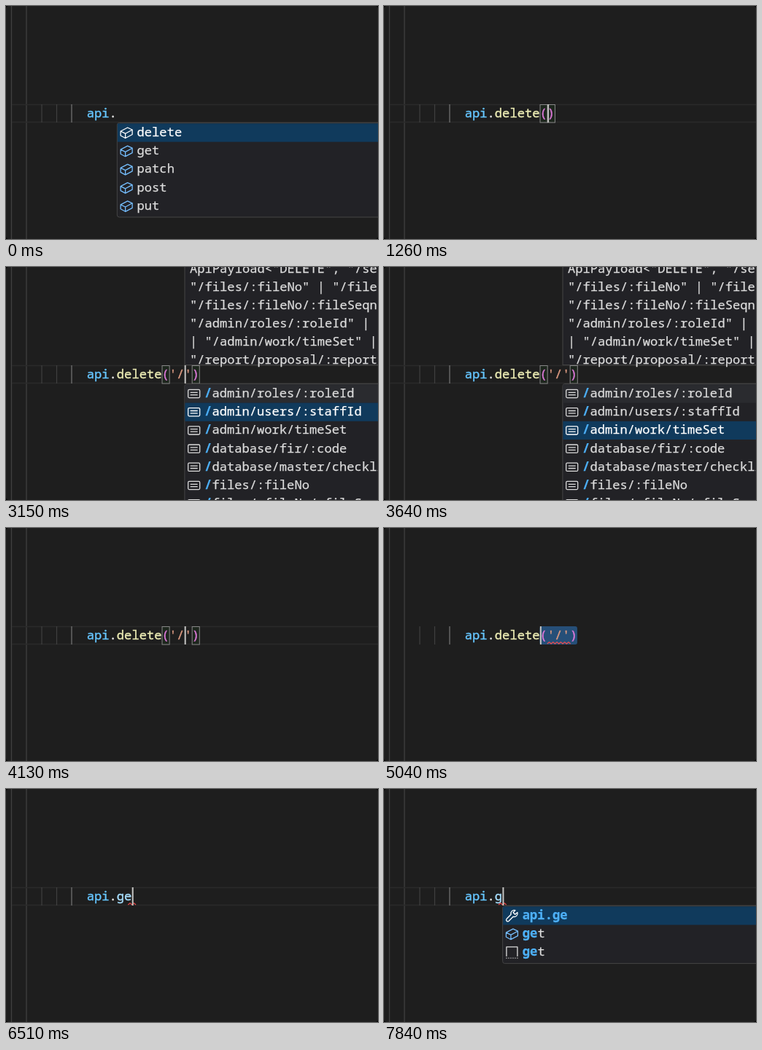
An HTML page that plays this animation: 510 px wide and 320 px high, repeating every 8000 ms.

```html
<!DOCTYPE html>
<html lang="en">
<head>
<meta charset="utf-8">
<title>Editor completion</title>
<style>
html, body { margin: 0; width: 100%; height: 100%; overflow: hidden; background: #000; }
svg { display: block; width: 510px; height: 320px; }
text { font: 17.14px "Noto Sans Mono", "DejaVu Sans Mono", monospace; white-space: pre; font-variant-ligatures: none; stroke-width: .25; }
.code { stroke-width: .4; }
.match { font-weight: 700; }
.icon { fill: none; stroke-width: 1.3; stroke-linejoin: round; stroke-linecap: round; }
</style>
</head>
<body>
<svg viewBox="0 0 510 320">
  <rect width="510" height="320" rx="4" fill="#1e1e1e"/>
  <path d="M7.5 0V320M28 0V320" stroke="#404040" stroke-width="1.3"/>
  <g id="view"></g>
</svg>
<script>
const LOOP = 8000, CHAR = 10.285, LEFT = 110.7, TOP = 135, ROW = 25.2;
const PANEL = '#222226', EDGE = '#454545', BLUE = '#75beff', PLAIN = '#dcdcdc';
const MATCH = '#4db0f8', BRACKET = '#dc78d8';
const view = document.getElementById('view');
const colX = col => LEFT + col * CHAR;
const escapeText = s => s.replace(/&/g, '&amp;').replace(/</g, '&lt;');

const rect = (x, y, w, h, fill, extra = '') =>
  `<rect x="${x}" y="${y}" width="${w}" height="${h}" fill="${fill}" ${extra}/>`;
const text = (x, y, s, fill, extra = '') =>
  `<text x="${x}" y="${y}" fill="${fill}" stroke="${fill}" ${extra}>${escapeText(s)}</text>`;

const icons = {
  method: 'M-8-2L1.5-7L8-4V2.5L-1.5 7.5L-8 4ZM-8-2L-1.5 1.2L8-4M-1.5 1.2V7.5',
  value: 'M-6.5-5.6H6.5Q8-5.6 8-4.1V4.1Q8 5.6 6.5 5.6H-6.5Q-8 5.6-8 4.1V-4.1Q-8-5.6-6.5-5.6ZM-4.5-1.7H4.5M-4.5 1.7H4.5',
  wrench: 'M7.5-4.5L4.3-1.7L1.7-4.3L4.5-7.5C1-8.5-2.3-5.5-1.3-1.7L-7.2 4.2C-9 6.5-6.5 9-4.2 7.2L1.7 1.3C5.5 2.3 8.5-1 7.5-4.5Z',
  snippet: 'M-7.5 5V-7.5H7.5V5M-7.5 7.8h.1M-4.5 7.8h.1M-1.5 7.8h.1M1.5 7.8h.1M4.5 7.8h.1M7.5 7.8h.1'
};

// Each item: icon, matched prefix, remaining text
const methods = ['delete', 'get', 'patch', 'post', 'put'].map(s => ['method', '', s]);
const routes = [
  'admin/roles/:roleId', 'admin/users/:staffId', 'admin/work/timeSet',
  'database/fir/:code', 'database/master/checklist', 'files/:fileNo',
  'files/:fileNo/:fileSeqno'
].map(s => ['value', '/', s]);
const fixes = [['wrench', 'api.ge', ''], ['method', 'ge', 't'], ['snippet', 'ge', 't']];

const docLines = [
  'ApiPayload<"DELETE", "/se', '"/files/:fileNo" | "/file',
  '"/files/:fileNo/:fileSeqn', '"/admin/roles/:roleId" | ',
  '| "/admin/work/timeSet" | ', '"/report/proposal/:report'
];

function drawList(items, col, selected) {
  const x = colX(col) + .5, top = 161.4;
  let out = rect(x, 160.5, 400, items.length * ROW + 3.5, PANEL, `rx="3" stroke="${EDGE}"`);
  items.forEach(([icon, match, rest], i) => {
    const y = top + i * ROW, on = i === selected;
    if (on) out += rect(x + .5, y, 400, ROW, '#103a5c');
    else if (i === 0 && selected > 0) out += rect(x + .5, y, 400, ROW, '#2a2b2f');
    const tint = on ? '#fff' : icon === 'method' ? BLUE : PLAIN;
    out += `<path class="icon" transform="translate(${x + 12.8} ${y + 12.6})" stroke="${tint}" d="${icons[icon]}"/>`;
    out += text(x + 27.2, y + 17.5, match, MATCH, 'class="match"');
    out += text(x + 27.2 + match.length * CHAR, y + 17.5, rest, on ? '#fff' : PLAIN);
  });
  return out;
}

function drawDocs() {
  return rect(245, -4, 300, 138.5, PANEL, `stroke="${EDGE}"`) +
    docLines.map((s, i) => text(252, 8 + i * 25, s, PLAIN)).join('');
}

function squiggle(from, to) {
  let d = `M${from} 159`;
  for (let x = from, up = true; x < to - 1; x += 2.65, up = !up) d += `l2.65 ${up ? -2.4 : 2.4}`;
  return `<path d="${d}" fill="none" stroke="#f14c4c" stroke-width="1.2" stroke-linejoin="round"/>`;
}

function drawCode({ member, args, called }) {
  const parts = [['api', '#66c6ff'], ['.', '#e6e6e6'], [member, called ? '#ececb4' : '#a8e0ff']];
  if (args !== null) parts.push(['(', BRACKET], [args, '#dc9a80'], [')', BRACKET]);
  let col = 0;
  return parts.map(([s, fill]) => {
    const out = text(colX(col), 153, s, fill, 'class="code"');
    col += s.length;
    return out;
  }).join('');
}

function draw(s) {
  let out = '';
  if (!s.sel) out += `<path d="M8 135.5H510M8 159.5H510" stroke="#2a2a2a" stroke-width="1.5"/>`;
  out += `<path d="M49 135V160M69.5 135V160" stroke="#404040" stroke-width="1.2"/>`;
  out += `<path d="M90 135V160" stroke="#777" stroke-width="1.2"/>`;
  if (s.sel) out += rect(colX(s.sel[0]), TOP, (s.sel[1] - s.sel[0]) * CHAR, 25, '#264f78', 'rx="3"');
  if (s.args !== null && !s.sel) {
    const open = 4 + s.member.length;
    for (const col of [open, open + 1 + s.args.length])
      out += rect(colX(col) + .5, TOP + .5, CHAR - .2, 24.5, '#1d261d', 'stroke="#888"');
  }
  out += drawCode(s);
  if (s.error === 'args') out += squiggle(colX(11), colX(14));
  if (s.error === 'end') out += squiggle(colX(s.col) - 5, colX(s.col) + 6);
  if (s.caret) out += rect(colX(s.col) + .3, TOP, 2, 25, '#c4c4c2');
  if (s.docs) out += drawDocs();
  if (s.list) out += drawList(s.list, s.listCol, s.row);
  view.innerHTML = out;
}

// Each step lists only what changes at its time
const steps = [
  [0, { member: '', args: null, called: false, col: 4, caret: false, sel: null,
        error: '', list: methods, listCol: 4, row: 0, docs: false }],
  [280, { caret: true }],
  [770, { member: 'delete', col: 10, list: null }],
  [1190, { args: '', col: 11 }],
  [1260, { called: true }],
  [1470, { args: "''", col: 12 }],
  [2030, { args: "'/'", col: 13 }],
  [2520, { caret: false }],
  [2730, { list: routes, listCol: 13, row: 0 }],
  [3010, { row: 1, caret: true }],
  [3080, { docs: true }],
  [3290, { row: 2 }],
  [3640, { caret: false }],
  [4060, { list: null, docs: false, caret: true }],
  [4340, { error: 'args' }],
  [4480, { col: 14 }],
  [4620, { col: 15 }],
  [5040, { col: 10, sel: [10, 15] }],
  [5110, { args: null, sel: null, error: '' }],
  [5180, { called: false }],
  [5390, { col: 4, sel: [4, 10] }],
  [5670, { member: '', sel: null }],
  [5740, { error: 'end' }],
  [6230, { member: 'g', col: 5 }],
  [6510, { member: 'ge', col: 6 }],
  [7070, { caret: false }],
  [7420, { list: fixes, listCol: 6, row: 0 }],
  [7490, { caret: true }],
  [7840, { member: 'g', col: 5, listCol: 5 }]
];
let merged = {};
const states = steps.map(([at, change]) => ({ at, ...(merged = { ...merged, ...change }) }));

let shown = null;
const start = performance.now();
function tick() {
  const time = (performance.now() - start) % LOOP;
  const state = states.filter(s => s.at <= time).pop();
  if (state !== shown) draw(shown = state);
  requestAnimationFrame(tick);
}
tick();
</script>
</body>
</html>
```
